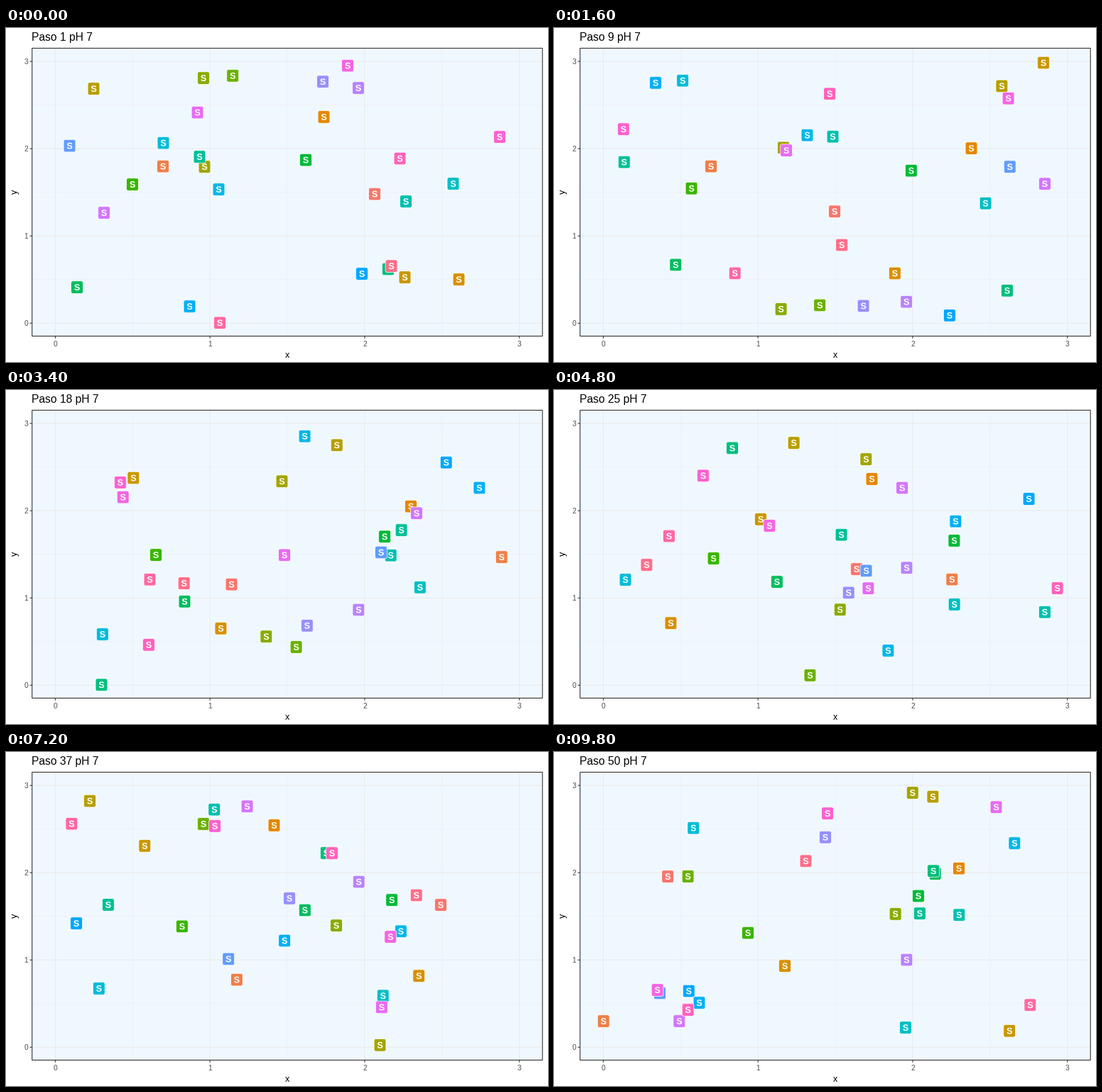
A matplotlib script for the animation above (10000 ms loop, 763 by 471 pixels).

```python
import math

import numpy as np
import matplotlib.pyplot as plt
from matplotlib.animation import FuncAnimation
from matplotlib.patches import FancyBboxPatch, PathPatch, Rectangle
from matplotlib.textpath import TextPath
from matplotlib.transforms import Affine2D

W, H, DPI = 763, 471, 64
STEPS = 50
FONT = "Liberation Sans"

# Panel geometry in pixels, y pointing down
LEFT, RIGHT, TOP, BOTTOM = 36.7, 755.2, 28.5, 434.5
ORIGIN = np.array([69.4, 416.3])        # where x = 0 and y = 0 lie
SPAN = np.array([653.3, -369.2])        # three units, the wrap-around box
UNIT = SPAN / 3
RADIUS = 0.05                           # meeting distance in axis units

# Start of each particle: x, y, then its velocity in pixels per step
START = np.array([
    (519, 234.5, -15.5, 3.08), (221, 195.5, 19.625, -4.5),
    (447.5, 125.9, 17.5, 5.52), (637.5, 355, -19.71, -1.08),
    (561.5, 352, 15.95, 8.33), (123.5, 86, -18.3, -0.46),
    (279.5, 196, 7.265, -4.455), (278, 71, 5.195, -5.42),
    (319.2, 67.7, 6.875, -5.694), (178, 221, 1.94, 0.704),
    (422, 186.5, 10.1, 1.88), (100, 366, 8.91, -3.96),
    (538, 340.4, 16.65, 5.05), (272.5, 182, -21.72, 0.94),
    (563, 245, -21.31, -11.43), (629.5, 220, -2.745, 3.45),
    (221.5, 162.5, -5.04, -10.99), (299.5, 228, 7.12, -9.555),
    (258.5, 393, -14.435, 6.74), (501, 347, 6.98, 7.34),
    (89.5, 166.5, -12.635, 3.7), (446, 76.1, -1.306, -6.625),
    (496, 85, 0.02, -8.46), (138, 261, -12.55, -5.108),
    (269.5, 119.5, 7.204, 6.69), (481, 53.5, 19.82, 5.765),
    (695, 154, 7.008, -1.367), (554.5, 184.45, -20.8, -11.406),
    (301, 416.2, -5.795, -8.74), (542.5, 336.1, -17.17, -3.714),
])


def simulate():
    """Straight paths in a wrapping box; the earlier of two that meet turns back."""
    pos, vel = START[:, :2].copy(), START[:, 2:].copy()
    track = [pos.copy()]
    for _ in range(STEPS - 1):
        gap = (pos[:, None] - pos[None]) / UNIT
        near = np.hypot(gap[..., 0], gap[..., 1]) < RADIUS
        vel[np.triu(near, 1).any(axis=1)] *= -1
        pos = ORIGIN + (pos + vel - ORIGIN) % SPAN
        track.append(pos.copy())
    return track


def px(size):
    """Pixels to points."""
    return size * 72 / DPI


def hcl(hue, chroma=100, lum=65):
    """Polar LUV colour to sRGB."""
    a = math.radians(hue)
    y = ((lum + 16) / 116) ** 3
    u = chroma * math.cos(a) / (13 * lum) + 0.1978398
    v = chroma * math.sin(a) / (13 * lum) + 0.4683363
    x = 9 * y * u / (4 * v)
    z = -x / 3 - 5 * y + 3 * y / v
    lin = np.array([
        3.240479 * x - 1.53715 * y - 0.498535 * z,
        -0.969256 * x + 1.875992 * y + 0.041556 * z,
        0.055648 * x - 0.204043 * y + 1.057311 * z,
    ]).clip(0, 1)
    return np.where(lin > 0.00304, 1.055 * lin ** (1 / 2.4) - 0.055,
                    12.92 * lin).clip(0, 1)


def label(x, y, text, size, color="black", **kw):
    return ax.text(x, y, text, fontsize=px(size), color=color, family=FONT, **kw)


def line(xs, ys, color, width, z):
    ax.plot(xs, ys, color=color, lw=px(width), zorder=z,
            solid_capstyle="butt", snap=False)


def panel(**kw):
    ax.add_patch(Rectangle((LEFT, TOP), RIGHT - LEFT, BOTTOM - TOP,
                           snap=False, **kw))


def draw_axes():
    panel(fc="#F0F8FF", ec="none", zorder=0)
    for half in range(7):
        gx, gy = ORIGIN + UNIT * half / 2
        major = half % 2 == 0
        width = 1.2 if major else 0.5
        line([gx, gx], [TOP, BOTTOM], "#EBEBEB", width, 1)
        line([LEFT, RIGHT], [gy, gy], "#EBEBEB", width, 1)
        if major:
            text = str(half // 2)
            line([gx, gx], [BOTTOM, BOTTOM + 3.2], "#333333", 1.1, 2)
            line([LEFT - 3.2, LEFT], [gy, gy], "#333333", 1.1, 2)
            label(gx, 449, text, 10.1, "#4D4D4D", ha="center", va="baseline")
            label(31, gy + 3.8, text, 10.1, "#4D4D4D", ha="right", va="baseline")
    panel(fc="none", ec="#333333", lw=px(1.1), zorder=90)
    label(396, 465, "x", 12.6, ha="center", va="baseline")
    label(13, 231, "y", 12.6, ha="center", va="center", rotation=90)


def make_tiles():
    glyph = TextPath((0, 0), "S", size=12.6,
                     prop={"family": FONT, "weight": "bold"})
    box = glyph.get_extents()
    glyph = (Affine2D()
             .translate(-(box.x0 + box.x1) / 2, -(box.y0 + box.y1) / 2)
             .scale(1, -1).transform_path(glyph))
    tiles = []
    n = len(START)
    for i in range(n):
        tile = FancyBboxPatch((-8.4, -8.8), 16.8, 17.6,
                              boxstyle="round,pad=0,rounding_size=2.5",
                              fc=hcl(15 + 360 * i / n), ec="white",
                              lw=px(0.7), zorder=10 + i)
        letter = PathPatch(glyph, fc="white", ec="none", zorder=10.5 + i)
        ax.add_patch(tile)
        ax.add_patch(letter)
        tiles.append((tile, letter))
    return tiles


def update(frame):
    title.set_text(f"Paso {frame + 1} pH 7")
    for parts, (x, y) in zip(tiles, track[frame]):
        place = Affine2D().translate(x, y - 0.4) + ax.transData
        for part in parts:
            part.set_transform(place)
    return []


fig = plt.figure(figsize=(W / DPI, H / DPI), dpi=DPI, facecolor="white")
ax = fig.add_axes([0, 0, 1, 1])
ax.axis("off")
draw_axes()
title = label(36.5, 18, "", 15.6, va="baseline")
tiles = make_tiles()
ax.set_xlim(0, W)
ax.set_ylim(H, 0)
track = simulate()

anim = FuncAnimation(fig, update, frames=STEPS, interval=200,
                     init_func=lambda: update(0), repeat=True, repeat_delay=0)
plt.show()
```
